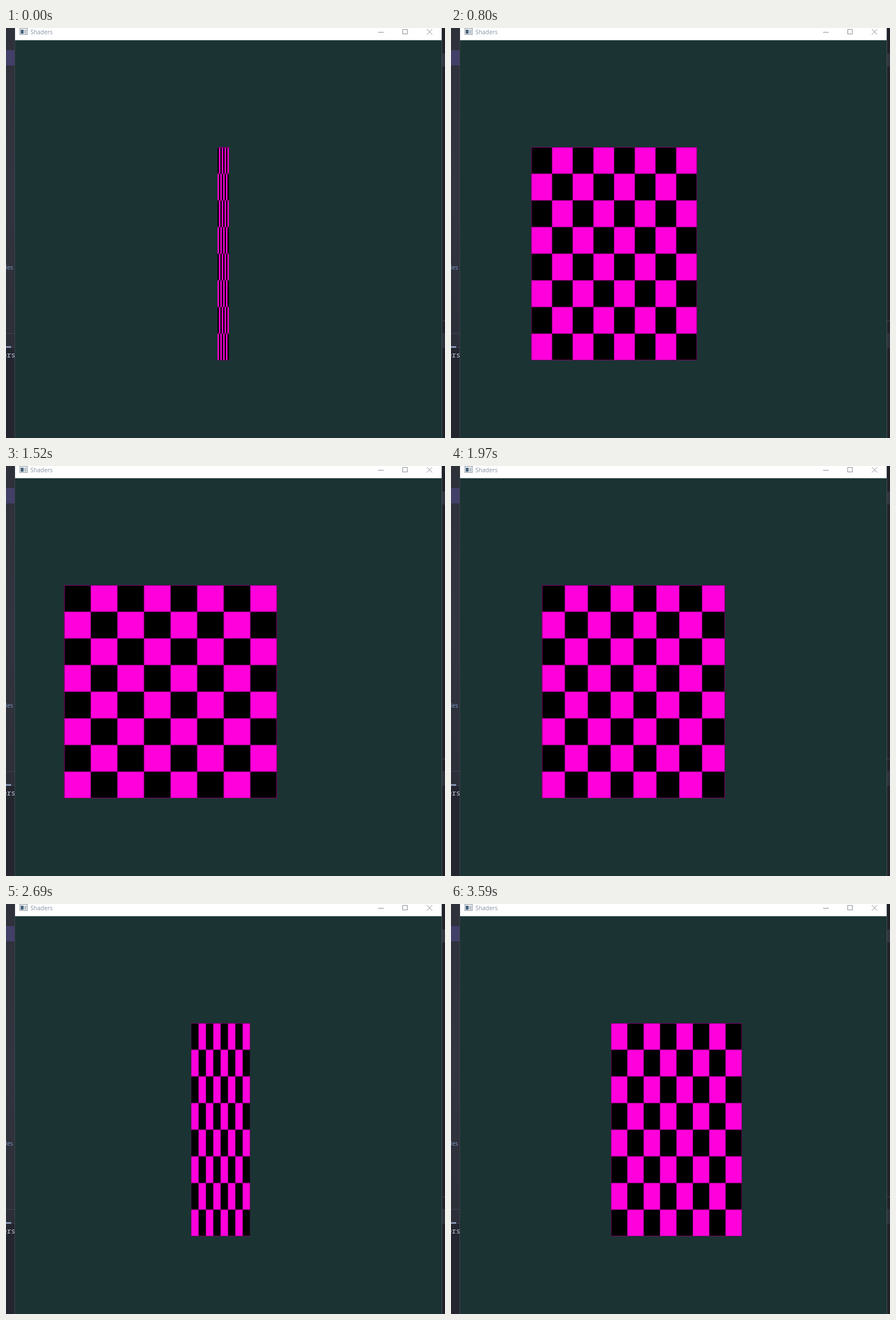
An HTML page that plays this animation: 774 by 723 pixels, repeating every 3.64 s.

```html
<!DOCTYPE html>
<html lang="en">
<head>
<meta charset="utf-8">
<title>Shaders</title>
<style>
  html, body { margin: 0; width: 100%; height: 100%; overflow: hidden; background: #1b3333; }
  svg { display: block; }
  .ui { font-family: "Open Sans", "Noto Sans", sans-serif; }
  .mono { font-family: "Noto Sans Mono", "DejaVu Sans Mono", monospace; }
</style>
</head>
<body>
<svg width="774" height="723" viewBox="0 0 774 723">
  <defs>
    <linearGradient id="side" x1="0" y1="0" x2="0" y2="1">
      <stop offset="0" stop-color="#2e303a"/>
      <stop offset="0.5" stop-color="#32343f"/>
      <stop offset="1" stop-color="#2c2e38"/>
    </linearGradient>
  </defs>

  <!-- editor behind the window -->
  <rect width="16" height="565" fill="url(#side)"/>
  <rect y="39" width="16" height="27" fill="#423f68"/>
  <rect y="538" width="16" height="1" fill="#41444f"/>
  <rect y="563" width="16" height="1" fill="#41444f"/>
  <rect y="561" width="9" height="3" fill="#8797b8"/>
  <rect y="564" width="16" height="159" fill="#24262f"/>
  <text class="ui" x="-1" y="426" font-size="10.5" fill="#7f9bc4">les</text>
  <text class="mono" x="-6" y="581" font-size="12.6" fill="#c3cbdc">ers</text>

  <rect x="768" width="6" height="723" fill="#202228"/>
  <rect x="769" y="45" width="5" height="23" fill="#32343f"/>
  <rect x="769" y="516" width="5" height="1" fill="#41444f"/>
  <rect x="769" y="538" width="5" height="26" fill="#2e303a"/>

  <!-- window -->
  <rect x="15" width="1" height="723" fill="#3d434c"/>
  <rect x="768" width="1" height="723" fill="#46505a"/>
  <rect x="16" y="21" width="752" height="702" fill="#1b3333"/>
  <rect x="16" width="752" height="21.5" fill="#fff"/>
  <rect x="24.5" y="0.5" width="13" height="11" fill="#f4f6f8" stroke="#8b959e"/>
  <rect x="26" y="3" width="5" height="7" fill="#46627c"/>
  <rect x="32" y="3" width="4" height="7" fill="#b9c3cb"/>
  <text class="ui" x="43" y="11" font-size="10.4" fill="#8593a3">Shaders</text>
  <g fill="none" stroke="#8a8f96">
    <path d="M656 7.5h10"/>
    <rect x="699.5" y="2.5" width="8" height="8"/>
    <path d="M742 2l9.5 9.5M751.5 2L742 11.5"/>
  </g>

  <g id="quad">
    <rect x="-188" y="-188" width="376" height="376"/>
    <path id="cells" fill="#ff00dc"/>
    <path id="seams" fill="none" stroke="#80006e" stroke-width="1.2"/>
  </g>
</svg>
<script>
  const LOOP = 3640, STEP = 50, HALF = 188, CELL = 47;
  const runs = [[0, 950], [1020, 2470], [2540, 3590]];
  const el = id => document.getElementById(id);
  const quad = el("quad");

  function build() {
    let cells = "", seams = "";
    for (let row = 0; row < 8; row++)
      for (let col = 0; col < 8; col++)
        if ((row + col) % 2)
          cells += `M${col * CELL - HALF} ${row * CELL - HALF}h${CELL}v${CELL}h${-CELL}z`;
    for (let i = 0; i <= 8; i++) {
      const inset = i === 0 ? 0.5 : i === 8 ? -0.5 : 0;
      const p = i * CELL - HALF + inset;
      seams += `M${-HALF} ${p}H${HALF}M${p} ${-HALF}V${HALF}`;
    }
    el("cells").setAttribute("d", cells);
    el("seams").setAttribute("d", seams);
  }

  // The picture holds for one step at a time, with two longer holds.
  function held(t) {
    const [start, end] = runs.filter(r => r[0] <= t).pop();
    return Math.min(start + Math.floor((t - start) / STEP) * STEP, end);
  }

  // Turn about the vertical axis while sliding along the turned x axis.
  function draw(ms) {
    const t = held(ms % LOOP);
    const turn = Math.cos((0.05984 * t - 86.95) * Math.PI / 180);
    const slide = 0.045 * t - 170.5;
    quad.setAttribute("transform",
      `translate(392 398) scale(${turn.toFixed(5)} 1) translate(${slide.toFixed(3)} 0)`);
  }

  build();
  draw(0);
  let begin = null;
  function tick(now) {
    if (begin === null) begin = now;
    draw(Math.max(0, now - begin));
    requestAnimationFrame(tick);
  }
  requestAnimationFrame(tick);
</script>
</body>
</html>
```
